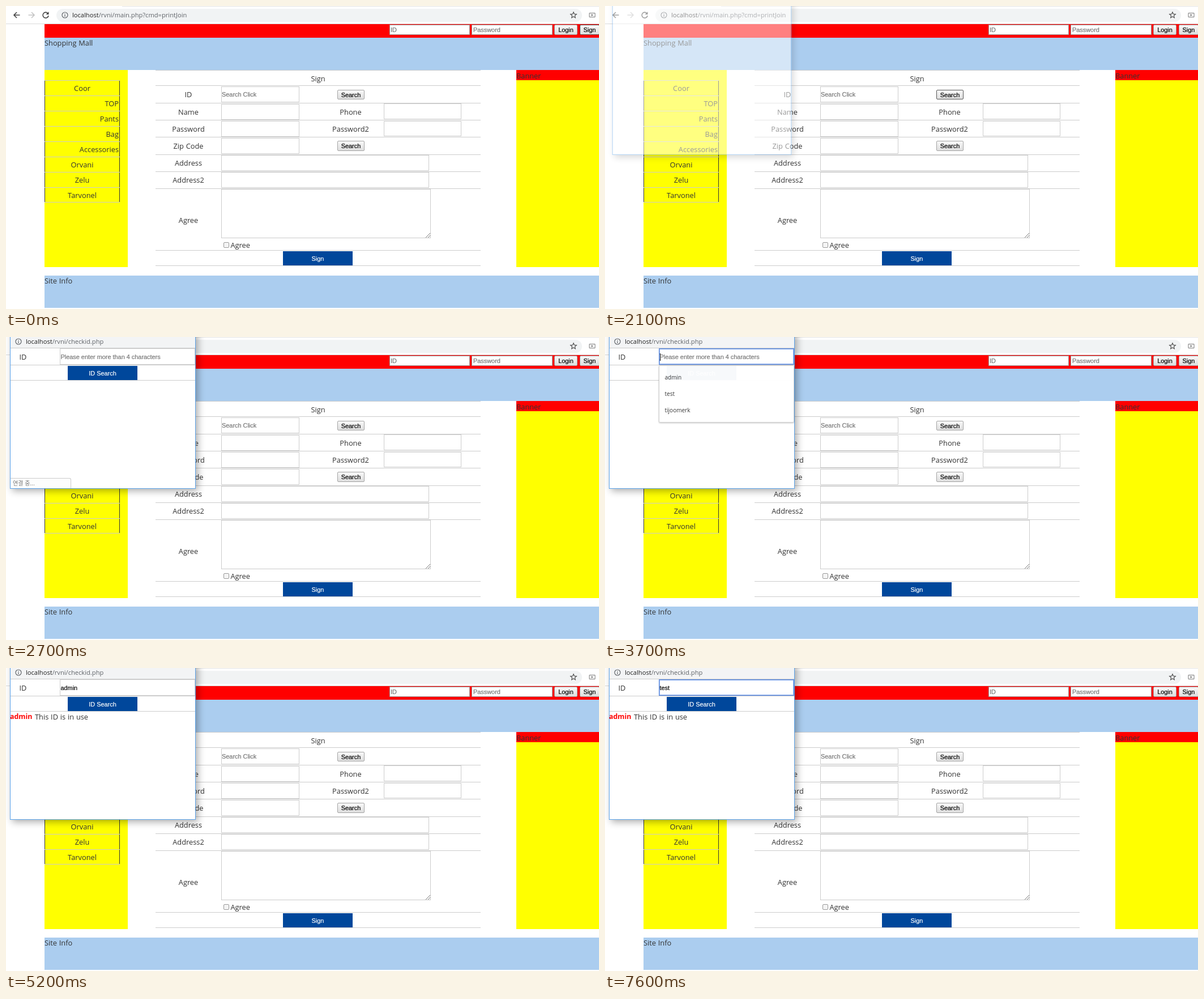
Recreate the animation shown at these times as an HTML page. Size 1047 by 535 pixels, loop 8000 ms.

```html
<!DOCTYPE html>
<html lang="en">
<head>
<meta charset="utf-8">
<title>Join form</title>
<style>
html, body { margin: 0; width: 100%; height: 100%; overflow: hidden; background: #fff; }
#stage { position: relative; width: 1047px; height: 535px; overflow: hidden; }
#stage div, svg { position: absolute; box-sizing: border-box; }
.text { height: 20px; line-height: 20px; white-space: pre; color: #333;
  font-family: "Open Sans", "Noto Sans", sans-serif; font-size: 12.8px; word-spacing: .5px; }
.ui { font-family: "Liberation Sans", Arial, sans-serif; font-size: 10.9px; word-spacing: 0;
  color: #000; -webkit-text-stroke: .2px; }
.hint { color: #757575; }
.white { color: #fff; }
.url { font-size: 11.15px; color: #5f6368; word-spacing: 0; }
.url b { font-weight: 400; color: #222; }
.item { font-size: 10px; }
.status { font-family: "Noto Sans CJK KR", "Noto Sans CJK", sans-serif; font-size: 10px; color: #777; }
.bad { color: #f00; font-weight: 700; font-size: 12.4px; }
.field { background: #fff; border: 1px solid #ccc; }
.login { border-color: #999; }
.focus { border-color: #5c8ade; box-shadow: inset 0 0 0 1px #8fb0ec; }
.button { background: linear-gradient(#f8f8f8, #dedede); border: 1px solid #a3a3a3; border-radius: 2px; }
.frame { background: #fff; border: 1px solid #5ba3ea; box-shadow: 4px 4px 12px rgba(0,0,0,.32); }
.menu { background: #fff; border: 1px solid #d0d0d0; border-radius: 2px; box-shadow: 0 1px 3px rgba(0,0,0,.25); }
.bubble { background: #fdfdfd; border: solid #ccc; border-width: 1px 1px 0 0; border-radius: 0 3px 0 0; }
#typed { font-weight: 400; display: inline-block; height: 13px; line-height: 13px; }
#typed.selected { background: #3390ff; color: #fff; }
#caret { display: inline-block; width: 1px; height: 13px; margin-right: -1px; background: #000; vertical-align: top; margin-top: 4px; }
</style>
</head>
<body>
<div id="stage"></div>
<script>
const stage = document.getElementById('stage');
let layer = stage;

function box(x1, y1, x2, y2, style = '', cls = '') {
  const el = document.createElement('div');
  el.className = cls;
  el.style.cssText = `left:${x1}px;top:${y1}px;width:${x2 - x1}px;height:${y2 - y1}px;${style}`;
  layer.append(el);
  return el;
}
const fill = (x1, y1, x2, y2, color) => box(x1, y1, x2, y2, `background:${color}`);
const rule = (x1, x2, y, color = '#ccc') => fill(x1, y, x2, y + 1, color);
const field = (x1, y1, x2, y2, cls = '') => box(x1, y1, x2, y2, '', 'field ' + cls);

// y is the middle of the line; align is 0 (left), .5 (centre) or 1 (right)
function text(x, y, html, cls = '', align = 0) {
  const el = document.createElement('div');
  el.className = 'text ' + cls;
  el.style.cssText = `left:${x}px;top:${y - 10}px;transform:translateX(${-100 * align}%)`;
  el.innerHTML = html;
  layer.append(el);
  return el;
}
function button(x1, y1, x2, y2, label) {
  const el = box(x1, y1, x2, y2, '', 'button');
  text((x1 + x2) / 2, (y1 + y2) / 2, label, 'ui', .5);
  return el;
}
function blueButton(x, y, label) {
  fill(x, y, x + 123, y + 25, '#00479b');
  text(x + 61.5, y + 12.5, label, 'ui white', .5);
}
function group(z) {
  const parent = layer;
  layer = box(0, 0, 1047, 535, `z-index:${z}`);
  return { el: layer, end() { layer = parent; } };
}
function icon(cx, cy, body, color = '#555', width = 1.6) {
  layer.insertAdjacentHTML('beforeend',
    `<svg style="left:${cx - 8}px;top:${cy - 8}px" width="16" height="16" viewBox="-8 -8 16 16"
      fill="none" stroke="${color}" stroke-width="${width}">${body}</svg>`);
}
const infoIcon = (x, y) => icon(x, y, '<circle r="5"/><path d="M0-.8V3M0-3V-1.8"/>', '#5f6368', 1.2);

// Browser bar
rule(205, 1047, 0, '#e4e4e4');
rule(0, 1047, 31, '#d9d9d9');
box(89, 5, 1017, 28, 'background:#f1f3f4;border-radius:12px');
const arrow = '<path d="M5.5 0H-5M0-5L-5 0L0 5"/>';
icon(19, 16, arrow, '#444');
icon(45, 16, `<g transform="scale(-1 1)">${arrow}</g>`, '#c4c4c4');
icon(70, 16, '<path d="M3.7-3.3A5 5 0 1 0 5 1"/><path d="M5.5-6V-1H.5Z" fill="#444" stroke="none"/>', '#444');
infoIcon(104, 16);
text(117, 16, '<b>localhost</b>/rvni/main.php?cmd=printJoin', 'url');
icon(1002, 16, '<path d="M0-5.3L1.5-1.8L5.3-1.5L2.4 1L3.3 4.8L0 2.8L-3.3 4.8L-2.4 1L-5.3-1.5L-1.5-1.8Z"/>', '#555', 1.2);
icon(1035, 16, '<path d="M-5-3.5H5V3.5H-5Z"/><path d="M-1.5-2L2 0L-1.5 2Z" fill="#777" stroke="none"/>', '#777', 1);

// Page header
fill(68, 32, 1047, 56, '#f00');
field(677, 33, 819, 51, 'login');
field(822, 33, 965, 51, 'login');
text(679, 42, 'ID', 'ui hint');
text(825, 42, 'Password', 'ui hint');
button(968, 33, 1009, 51, 'Login');
const joinButton = button(1013, 33, 1048, 51, 'Sign');
fill(68, 56, 1047, 113, '#abcdef');
text(68, 65, 'Shopping Mall');
fill(68, 476, 1047, 533, '#abcdef');
text(68, 485, 'Site Info');

// Side columns
fill(68, 113, 215, 461, '#ff0');
fill(901, 113, 1047, 461, '#ff0');
fill(901, 113, 1047, 131, '#f00');
text(901, 123, 'Banner');
fill(68, 131, 69, 347, '#333');
fill(200, 131, 201, 347, '#333');
['Coor', 'TOP', 'Pants', 'Bag', 'Accessories', 'Orvani', 'Zelu', 'Tarvonel'].forEach((name, i) => {
  const right = i > 0 && i < 5;
  rule(68, 201, 131 + 27 * i);
  text(right ? 199 : 134.5, 145 + 27 * i, name, '', right ? 1 : .5);
});
rule(68, 201, 346);

// Join form
[113, 140, 171, 201, 231, 262, 292, 322, 431, 458].forEach(y => rule(264, 838, y));
text(551, 128, 'Sign', '', .5);
['ID', 'Name', 'Password', 'Zip Code', 'Address', 'Address2'].forEach((label, i) => {
  const y = Math.round(156.3 + 30.2 * i);
  text(322, y, label, '', .5);
  field(380, y - 14, i < 4 ? 518 : 747, y + 14);
});
text(381, 156, 'Search Click', 'ui hint');
const searchButton = button(585, 148, 633, 165, 'Search');
button(585, 238, 633, 256, 'Search');
text(608.5, 187, 'Phone', '', .5);
text(608.5, 217, 'Password2', '', .5);
field(667, 172, 804, 200);
field(667, 203, 804, 230);
text(322, 378, 'Agree', '', .5);
field(380, 323, 750, 410);
icon(745, 405, '<path d="M-4 4L4-4M0 4L4 0"/>', '#777', 1);
box(384, 417, 394, 427, 'background:#f4f4f4;border:1px solid #999;border-radius:2px');
text(396.5, 422, 'Agree');
blueButton(489, 433, 'Sign');

// ID check window
const popup = group(1);
popup.el.style.transformOrigin = '171px 120px';
box(7, -12, 335, 268, '', 'frame');

const head = group(1);
fill(8, 0, 334, 19, '#f3f4f5');
rule(8, 334, 19);
infoIcon(22, 8);
text(35, 8, '<b>localhost</b>/rvni/checkid.php', 'url');
head.end();

const content = group(1);
rule(8, 334, 49);
rule(8, 334, 76);
text(30, 35, 'ID', '', .5);
const idField = field(95, 20, 334, 49);
text(96.5, 35, '<b id="typed"></b><i id="caret"></i><span id="hint" class="hint">Please enter more than 4 characters</span>', 'ui');
blueButton(109, 51, 'ID Search');
const result = group(1);
text(7, 86, 'admin', 'bad');
text(51, 86, 'This ID is in use');
result.end();
content.end();

const menu = group(2);
const menuBox = box(95, 50, 334, 151, '', 'menu');
const items = [0, 1, 2].map(i => text(105.5, 70.5 + 29.4 * i, '', 'item'));
menu.end();

const bubble = group(2);
box(8, 249, 115, 267, '', 'bubble');
text(12, 258, '연결 중...', 'status');
bubble.end();
popup.end();

const typed = document.getElementById('typed');
const caret = document.getElementById('caret');
const hint = document.getElementById('hint');

const LOOP = 8000;
const start = {
  join: 1, search: 0, popup: 0, scale: 1, head: 0, content: 0, bubble: 0, focus: 0,
  value: '', caret: 0, selected: 0, menu: 0, list: 'admin test tijoomerk', result: 0
};
// Each step changes only what it names
const steps = [
  [300, { join: .5 }],
  [400, { join: 0 }],
  [1600, { search: 1 }],
  [2100, { popup: .5, scale: .965 }],
  [2200, { popup: .85, scale: .991 }],
  [2300, { popup: 1, scale: 1, head: 1 }],
  [2500, { bubble: 1 }],
  [2700, { content: 1, search: 0 }],
  [2900, { bubble: .65 }],
  [3000, { bubble: .3 }],
  [3100, { bubble: 0 }],
  [3500, { focus: 1, caret: 1 }],
  [3700, { menu: .97 }],
  [3800, { value: 'a', menu: 1, list: 'admin' }],
  [4000, { value: 'ad' }],
  [4500, { value: 'adm' }],
  [4700, { value: 'admi' }],
  [4800, { value: 'admin', menu: 0 }],
  [5200, { result: 1, focus: 0, caret: 0 }],
  [6100, { focus: 1, caret: 1 }],
  [6300, { selected: 1, caret: 0 }],
  [6600, { selected: 0, value: 't', caret: 1, menu: .9, list: 'test' }],
  [6700, { value: 'te', menu: 1 }],
  [7000, { value: 'tes' }],
  [7100, { value: 'test', menu: 0 }],
  [7600, { caret: 0 }]
];

const show = (el, on) => { el.style.visibility = on ? 'inherit' : 'hidden'; };
const fade = (el, opacity) => { el.style.opacity = opacity; show(el, opacity > 0); };
const hover = (el, amount) => {
  const grey = 163 - 75 * amount;
  el.style.borderColor = `rgb(${grey},${grey},${grey})`;
};

function draw(time) {
  const s = Object.assign({}, start, ...steps.filter(([at]) => at <= time).map(step => step[1]));
  hover(joinButton, s.join);
  hover(searchButton, s.search);
  fade(popup.el, s.popup);
  popup.el.style.transform = `scale(${s.scale})`;
  show(head.el, s.head);
  show(content.el, s.content);
  show(result.el, s.result);
  fade(bubble.el, s.bubble);
  fade(menu.el, s.menu);
  idField.classList.toggle('focus', !!s.focus);
  typed.textContent = s.value;
  typed.classList.toggle('selected', !!s.selected);
  show(caret, s.caret);
  show(hint, !s.value);
  const names = s.list.split(' ');
  items.forEach((el, i) => { el.textContent = names[i] || ''; });
  menuBox.style.height = 13 + 29.4 * names.length + 'px';
}

function tick() {
  draw(performance.now() % LOOP);
  requestAnimationFrame(tick);
}
tick();
</script>
</body>
</html>
```
